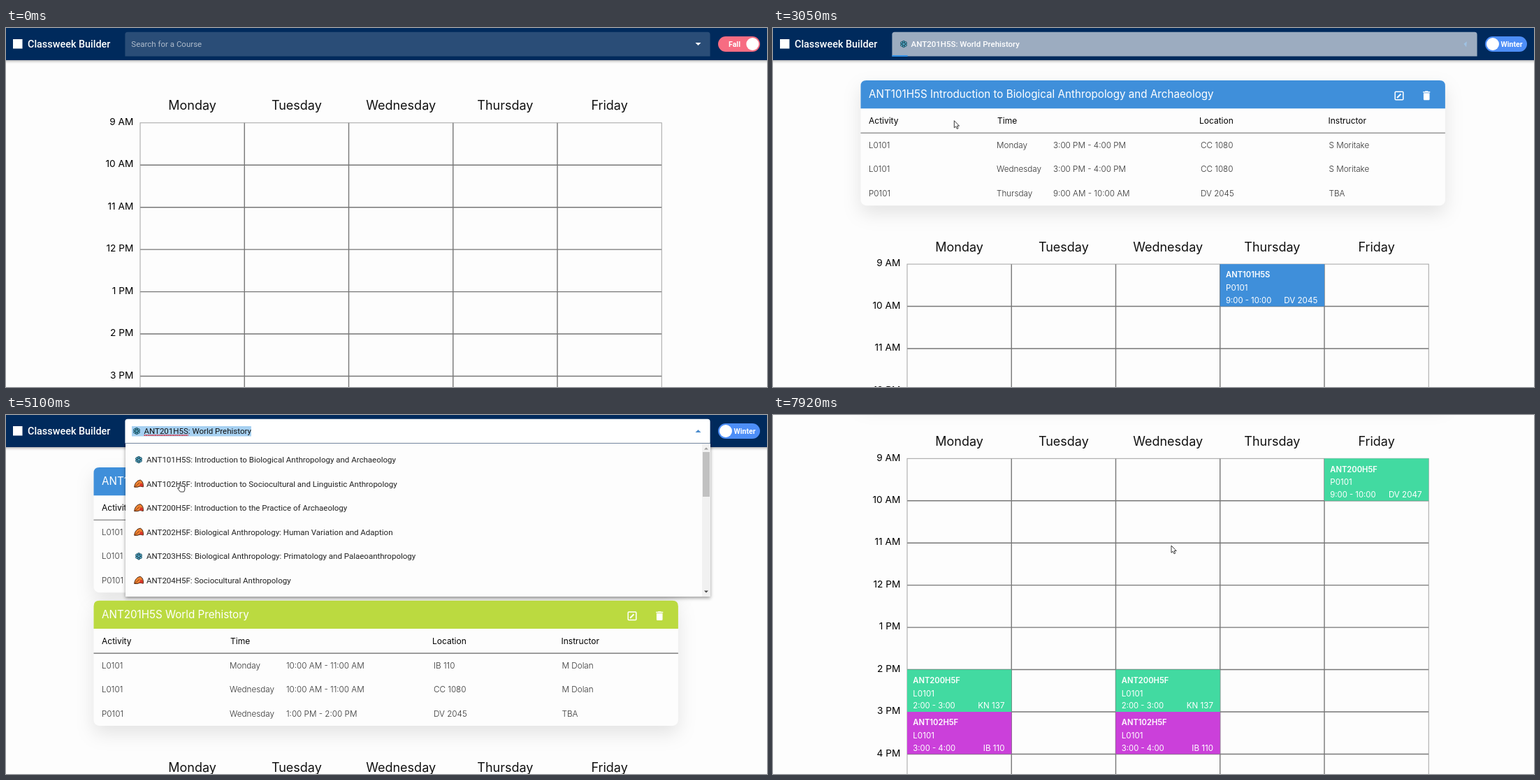
Recreate the animation shown at these times as an HTML page. Size 1089 by 514 pixels, loop 8000 ms.

```html
<!DOCTYPE html>
<html lang="en">
<head>
<meta charset="utf-8">
<title>Classweek Builder</title>
<style>
  html, body { margin: 0; width: 100%; height: 100%; overflow: hidden; background: #fdfdfd; }
  svg { display: block; width: 100%; height: 100%; }
  text { white-space: pre; }
  .page { font-family: Inter, "Open Sans", sans-serif; }
  .bar { font-family: Roboto, Arial, sans-serif; }
  .card { filter: drop-shadow(0 11px 13px rgba(0, 0, 0, .1)); }
  .head { filter: drop-shadow(0 1.5px 2px rgba(0, 0, 0, .4)); }
  .menu { filter: drop-shadow(0 2px 2.5px rgba(0, 0, 0, .4)); }
</style>
</head>
<body>
<svg viewBox="0 0 1089 514">
  <g id="scroller">
    <g id="page" class="page"></g>
    <g id="bar" class="bar"></g>
    <g id="menu" class="bar"></g>
  </g>
  <g id="cursor"></g>
</svg>
<script>
const LOOP = 8000, FADE = 200;
const LEFT = 192, COL = 149.25, ROW = 60.45;
const CARD_TOP = 74.9, CARD_HEAD = 40.3, CARD_ROW = 34.56, GAP = 11.5;
const DAYS = ['Monday', 'Tuesday', 'Wednesday', 'Thursday', 'Friday'];

const NAMES = {
  ANT101H5S: 'Introduction to Biological Anthropology and Archaeology',
  ANT102H5F: 'Introduction to Sociocultural and Linguistic Anthropology',
  ANT200H5F: 'Introduction to the Practice of Archaeology',
  ANT201H5S: 'World Prehistory',
  ANT202H5F: 'Biological Anthropology: Human Variation and Adaption',
  ANT203H5S: 'Biological Anthropology: Primatology and Palaeoanthropology',
  ANT204H5F: 'Sociocultural Anthropology'
};

// Meeting rows: activity, day index, start hour, room, instructor
const COURSES = {
  ANT101H5S: { color: '#3f8fda', rows: [
    ['L0101', 0, 15, 'CC 1080', 'S Moritake'],
    ['L0101', 2, 15, 'CC 1080', 'S Moritake'],
    ['P0101', 3, 9, 'DV 2045', 'TBA']] },
  ANT201H5S: { color: '#bbda40', rows: [
    ['L0101', 0, 10, 'IB 110', 'M Dolan'],
    ['L0101', 2, 10, 'CC 1080', 'M Dolan'],
    ['P0101', 2, 13, 'DV 2045', 'TBA']] },
  ANT102H5F: { color: '#cb40da', rows: [
    ['L0101', 0, 15, 'IB 110', 'TBA'],
    ['L0101', 2, 15, 'IB 110', 'TBA']] },
  ANT200H5F: { color: '#42daa1', rows: [
    ['L0101', 0, 14, 'KN 137', 'TBA'],
    ['L0101', 2, 14, 'KN 137', 'TBA'],
    ['P0101', 4, 9, 'DV 2047', 'TBA']] }
};

// Each pick: menu opens, course chosen, cards updated
const PICKS = [
  { open: 930, pick: 1812, show: 2200, code: 'ANT101H5S', cards: ['ANT101H5S'] },
  { open: 2450, pick: 2997, show: 3200, code: 'ANT201H5S', cards: ['ANT101H5S', 'ANT201H5S'] },
  { open: 4750, pick: 5600, show: 5850, code: 'ANT102H5F', cards: ['ANT102H5F'] },
  { open: 6350, pick: 7060, show: 7300, code: 'ANT200H5F', cards: ['ANT102H5F', 'ANT200H5F'] }
];
const TO_WINTER = 1812, TO_FALL = 5600;

const SCROLL = [[3400, 0], [3600, 525], [4000, 525], [4150, 345.3], [4400, 0], [7480, 0], [7920, 432]];

const POINTER = [
  [70, 1022, 472, 'arrow'], [760, 300, 30, 'beam'], [860, 200, 23, 'beam'], [1000, 262, 26, 'beam'],
  [1250, 262, 64, 'hand'], [1812, 262, 64, 'arrow'], [1900, 263, 28, 'beam'], [2480, 262, 28, 'beam'],
  [2700, 257, 130, 'hand'], [2997, 257, 130, 'arrow'], [3300, 270, 145, 'arrow'], [3450, 278, 149, 'hand'],
  [4200, 278, 149, 'arrow'], [4520, 262, 30, 'beam'], [4800, 262, 30, 'beam'], [5050, 248, 97, 'hand'],
  [5600, 248, 97, 'arrow'], [5900, 291, 33, 'beam'], [6450, 291, 33, 'beam'], [6600, 285, 97, 'hand'],
  [7060, 285, 97, 'arrow'], [7500, 570, 187, 'arrow']
];

const SHAPES = {
  arrow: '<path d="M0 0V10.2L2.3 8.2 4 11.7 5.7 10.9 4.1 7.5H7.2Z" fill="#fff" stroke="#222" stroke-width=".9"/>',
  hand: '<path d="M0 1Q1-.6 2 1V5Q3 4 4 5 5 4.4 6 5.5 7.5 5 7.8 7V10L6.6 13H1.4L-2.4 8Q-2.6 6.4 0 8Z" fill="#fff" stroke="#222" stroke-width=".9"/>',
  beam: '<path d="M-2-5H-.5L0-4.5 .5-5H2M0-4.5V4.5M-2 5H-.5L0 4.5 .5 5H2" fill="none" stroke="#8a8f96"/>'
};

const clamp = v => Math.max(0, Math.min(1, v));
const easeOut = p => 1 - (1 - clamp(p)) ** 2;
const mix = (a, b, p) => a + (b - a) * p;
const rgb = (a, b, p) => `rgb(${a.map((v, i) => Math.round(mix(v, b[i], p)))})`;
const $ = id => document.getElementById(id);

const pen = document.createElement('canvas').getContext('2d');
function measure(s) {
  pen.font = '11.5px Roboto, Arial, sans-serif';
  return pen.measureText(s).width;
}

// Text placed by the middle of its capitals
const text = (s, x, y, size, fill = '#111', weight = 400, anchor = 'start') =>
  `<text x="${x}" y="${(y + size * .36).toFixed(2)}" font-size="${size}" fill="${fill}" font-weight="${weight}" text-anchor="${anchor}">${s}</text>`;
const rect = (x, y, w, h, fill, more = '') =>
  `<rect x="${x}" y="${y}" width="${w}" height="${h}" fill="${fill}" ${more}/>`;
const path = (d, stroke, width, more = '') =>
  `<path d="${d}" fill="none" stroke="${stroke}" stroke-width="${width}" ${more}/>`;

function update(id, html) {
  const el = $(id);
  if (el.markup !== html) el.innerHTML = el.markup = html;
}

function track(keys, t) {
  let i = 0;
  while (i < keys.length - 1 && t >= keys[i + 1][0]) i++;
  const a = keys[i], b = keys[i + 1] || a;
  const p = b === a ? 0 : clamp((t - a[0]) / (b[0] - a[0]));
  return { at: k => mix(a[k], b[k], p), key: a };
}

const hour12 = h => h > 12 ? h - 12 : h;
const hourName = h => `${hour12(h)} ${h < 12 ? 'AM' : 'PM'}`;
const clock = h => `${hour12(h)}:00 ${h < 12 ? 'AM' : 'PM'}`;
const cardHeight = code => 75.6 + CARD_ROW * COURSES[code].rows.length;

function card(code, y) {
  const { color, rows } = COURSES[code];
  let s = rect(125.5, y, 836.4, cardHeight(code), '#fdfdfd', 'rx="8" class="card"');
  s += `<path d="M125.5 ${y + CARD_HEAD}V${y + 8}q0-8 8-8h820.4q8 0 8 8V${y + CARD_HEAD}z" fill="${color}"/>`;
  s += text(`${code} ${NAMES[code]}`, 137, y + 19.6, 15.2, '#fff');
  s += rect(890.2, y + 16.3, 11.6, 11.6, 'none', 'rx="1" stroke="#fff" stroke-width="1.5"');
  s += path(`M893 ${y + 25.1}l5.5-5.5`, '#fff', 2);
  s += `<path transform="translate(926.6 ${y + 13.3}) scale(.72)" fill="#fff" d="M6 19c0 1.1.9 2 2 2h8c1.1 0 2-.9 2-2V7H6v12zM19 4h-3.5l-1-1h-5l-1 1H5v2h14V4z"/>`;
  const heads = [['Activity', 137], ['Time', 321], ['Location', 610], ['Instructor', 794.5]];
  for (const [name, x] of heads) s += text(name, x, y + 57.6, 12, '#000');
  s += path(`M125.5 ${y + 75.4}h836.4`, '#666', 1.1);
  rows.forEach(([act, day, start, room, who], i) => {
    const cy = y + 92.8 + CARD_ROW * i;
    const cells = [[act, 137], [DAYS[day], 320], [`${clock(start)} - ${clock(start + 1)}`, 401], [room, 612], [who, 795.5]];
    for (const [value, x] of cells) s += text(value, x, cy, 11.7, '#333', 300);
  });
  return s;
}

function lesson(code, [act, day, start, room], top) {
  const x = LEFT + COL * day, y = top + ROW * (start - 9);
  return rect(x, y, COL, ROW, COURSES[code].color) +
    text(code, x + 8.3, y + 15.2, 11.2, '#fff', 600) +
    text(act, x + 8.3, y + 33.9, 11.6, '#fff') +
    text(`${hour12(start)}:00 - ${hour12(start + 1)}:00`, x + 8.3, y + 51.5, 11.3, '#fff') +
    text(room, x + COL - 9.7, y + 51.5, 11.6, '#fff', 400, 'end');
}

function page(cards, blocked) {
  let s = '', y = CARD_TOP;
  for (const code of cards) {
    s += card(code, y);
    y += cardHeight(code) + GAP;
  }
  const mid = y + 36.1 + (cards.length ? GAP : 0), top = mid + 24.8;
  const rows = 12, width = COL * 5, height = ROW * rows;
  DAYS.forEach((d, i) => s += text(d, LEFT + COL * (i + .5), mid, 18, '#111', 400, 'middle'));
  let inner = '';
  for (let i = 0; i <= rows; i++) {
    s += text(hourName(9 + i), 182.3, top - 1.7 + ROW * i, 13.7, '#000', 400, 'end');
    if (i) inner += `M${LEFT} ${top + ROW * i}h${width}`;
  }
  for (let i = 1; i < 5; i++) inner += `M${LEFT + COL * i} ${top}v${height}`;
  s += path(inner, '#777', 1.4);
  s += rect(LEFT, top, width, height, 'none', 'stroke="#999" stroke-width=".9"');
  for (const code of cards) for (const row of COURSES[code].rows) s += lesson(code, row, top);
  if (blocked) {
    const by = top + ROW * 2;
    s += rect(LEFT + .5, by + .6, COL - 1, ROW - 1.2, '#e6e6e6');
    s += text('Block This Time', LEFT + COL / 2, by + 29.5, 11.9, '#222', 400, 'middle');
  }
  return s;
}

function termIcon(code, x, y) {
  const at = `<g transform="translate(${x} ${y})">`;
  if (code.endsWith('F')) {
    return at + '<path d="M-6.3 4.6C-6-1-2-5.4 2.5-5.4 5.6-4 6.8 0 6.3 4.4L2 3.4-2 4.6Z" fill="#ee8433" stroke="#42210f"/>' +
      '<path d="M.5 3.4L3-1.5 6 1 5.8 4Z" fill="#d8352a"/><path d="M-6 4.6L1-1.5" stroke="#8c3b12" fill="none"/></g>';
  }
  let arms = '';
  for (let i = 0; i < 6; i++) arms += `<path d="M0 0V-5M-1.7-4.2L0-2.8 1.7-4.2" transform="rotate(${i * 60})"/>`;
  return at + `<g fill="none" stroke="#10303d" stroke-width="2.7">${arms}</g>` +
    `<g fill="none" stroke="#63bfe0" stroke-width=".8">${arms}</g></g>`;
}

function field(value, focus, isOpen) {
  let s = `<path d="M170.4 40.4V9.4q0-3.6 3.6-3.6h830q3.6 0 3.6 3.6v31z" fill="#fff" fill-opacity="${mix(.165, 1, focus)}"/>`;
  if (!value) {
    s += text('Search for a Course', 179.3, 23, 11.5, isOpen ? '#777' : 'rgba(255,255,255,.62)');
  } else {
    const label = `${value}: ${NAMES[value]}`;
    if (isOpen) s += rect(180, 16, 17.5 + measure(label), 14.5, '#0078d7', 'opacity=".35"');
    s += termIcon(value, 187, 23);
    s += text(label, 197.5, 23, 11.5, isOpen ? '#111' : '#fff', isOpen ? 400 : 500);
    if (isOpen) {
      for (const word of [value, 'Sociocultural']) {
        const i = label.indexOf(word);
        if (i >= 0) s += path(`M${197.5 + measure(label.slice(0, i))} 29h${measure(word)}`, '#e0202c', 1.5, 'stroke-dasharray="2 .6"');
      }
    }
  }
  const arrow = rgb([255, 255, 255], [75, 140, 205], focus);
  return s + `<path d="M-4-2H4L0 2Z" transform="translate(990.5 23) rotate(${180 * focus})" fill="${arrow}"/>`;
}

function loader(ms) {
  const p = ms / 1260 * 1.25;
  const from = clamp(-.35 + 1.35 * p), to = clamp(1.9 * p);
  return rect(170.5 + 837 * from, 39, 837 * (to - from), 2, '#2f8fe6');
}

function toggle(winter) {
  const on = winter > .5;
  return rect(1019, 12, 60, 22, rgb([247, 108, 130], [77, 142, 247], winter), 'rx="11"') +
    `<circle cx="${mix(1068.3, 1030, winter)}" cy="23" r="9" fill="#fff"/>` +
    text(on ? 'Winter' : 'Fall', on ? 1057 : 1042.5, 23, 10.6, '#fff', 700, 'middle');
}

function menu(value) {
  let s = rect(171, 41, 837, 219, '#fdfdfd', 'class="menu"');
  Object.keys(NAMES).filter(c => c !== value).slice(0, 6).forEach((code, i) => {
    const y = 64 + CARD_ROW * i;
    s += termIcon(code, 190, y) + text(`${code}: ${NAMES[code]}`, 201, y, 11.5, '#222');
  });
  s += rect(996, 41, 12, 219, '#f1f1f1') + rect(997, 53, 10, 64, '#c1c1c1');
  return s + '<path d="M999 49.5h6l-3-3z" fill="#999"/><path d="M999 251.5h6l-3 3z" fill="#444"/>';
}

function render(t) {
  let value = '', cards = [], focus = 0, isOpen = false, loading = -1;
  for (const p of PICKS) {
    if (t >= p.open && t < p.pick) {
      isOpen = true;
      focus = easeOut((t - p.open) / FADE);
    }
    if (t >= p.pick) {
      value = p.code;
      focus = 1 - easeOut((t - p.pick) / FADE);
      loading = t < p.show ? t - p.pick - 40 : -1;
    }
    if (t >= p.show) cards = p.cards;
  }
  if (t >= TO_FALL && t < PICKS[2].show) cards = [];
  const winter = easeOut((t - TO_WINTER) / FADE) - easeOut((t - TO_FALL) / FADE);

  $('scroller').setAttribute('transform', `translate(0 ${-track(SCROLL, t).at(1)})`);
  update('page', page(cards, t >= 3600 && t < 4350));
  update('bar', rect(-5, -10, 1099, 56, '#002a5c', 'class="head"') +
    rect(10, 16, 13.5, 13.5, '#fff') +
    text('Classweek Builder', 31, 23, 14.4, '#fff', 500) +
    field(value, focus, isOpen) + (loading > 0 ? loader(loading) : '') + toggle(winter));
  update('menu', isOpen ? menu(value) : '');

  const ptr = track(POINTER, t);
  update('cursor', t < 70 ? '' : SHAPES[ptr.key[3]]);
  $('cursor').setAttribute('transform', `translate(${ptr.at(1)} ${ptr.at(2)})`);
}

const start = performance.now();
function tick(now) {
  render(Math.max(0, now - start) % LOOP);
  requestAnimationFrame(tick);
}
render(0);
requestAnimationFrame(tick);
</script>
</body>
</html>
```
